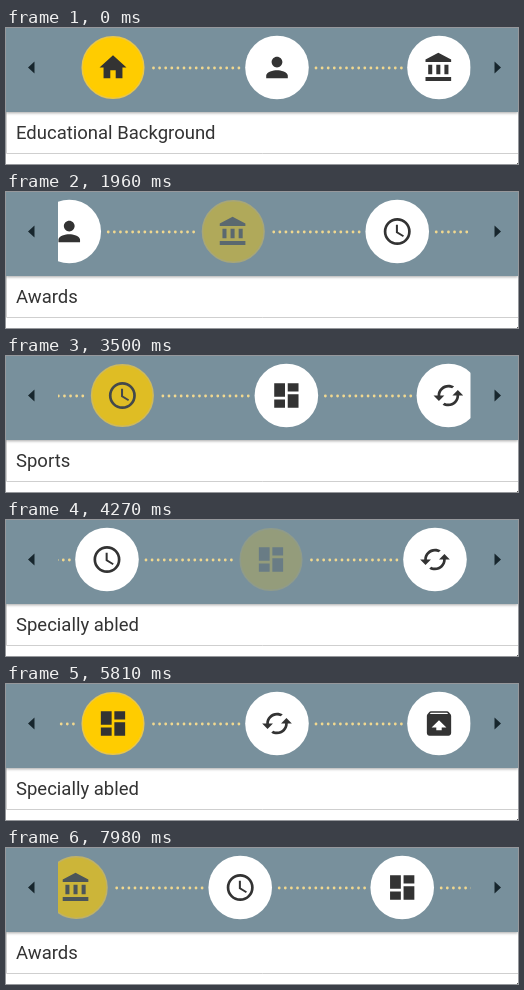
Recreate the animation shown at these times as an HTML page. Size 512x136 px, loop 8 s.

```html
<!DOCTYPE html>
<html lang="en">
<head>
<meta charset="utf-8">
<title>Profile steps</title>
<style>
  html, body { margin: 0; width: 100%; height: 100%; overflow: hidden; background: #fff; }
  svg { display: block; width: 512px; height: 136px; }
  .bar { fill: #78909c; filter: drop-shadow(0 1px 1.5px rgba(0, 0, 0, .35)); }
  .arrow { fill: #17262d; }
  .disc { fill: #fff; }
  .icon { fill: #333; }
  .active .disc { fill: #fc0; stroke: #e9c64a; stroke-width: 1.5; }
  .dots { fill: none; stroke: #f1d88f; stroke-width: 2.8; stroke-linecap: round; stroke-dasharray: 0 6.1; }
  .field { fill: none; stroke: #cfcfcf; }
  #label { font: 18.5px Roboto, sans-serif; fill: #333; }
</style>
</head>
<body>
<svg viewBox="0 0 512 136">
  <defs><clipPath id="view"><rect x="52" width="412.5" height="84"/></clipPath></defs>
  <path class="field" d="M.5 84V125.5H512"/>
  <rect class="bar" width="512" height="84"/>
  <path class="arrow" d="M22 39.5l6.5-6v12zM495 39.5l-6.5-6v12z"/>
  <g id="track" clip-path="url(#view)"></g>
  <text id="label" x="10" y="111"></text>
  <rect x="511" y="135" width="1" height="1" fill="#555"/>
</svg>
<script>
const LOOP = 8000, REST = 107, STEP = 162, MID = 39.5;

const steps = [
  ['Educational Background', 'M10 20v-6h4v6h5v-8h3L12 3 2 12h3v8z'],
  ['Professional Background', 'M12 12c2.21 0 4-1.79 4-4s-1.79-4-4-4-4 1.79-4 4 1.79 4 4 4zm0 2c-2.67 0-8 1.34-8 4v2h16v-2c0-2.66-5.33-4-8-4z'],
  ['Awards', 'M4 10v7h3v-7H4zm6 0v7h3v-7h-3zM2 22h19v-3H2v3zm14-12v7h3v-7h-3zm-4.5-9L2 6v2h19V6l-9.5-5z'],
  ['Sports', 'M12 2a10 10 0 1 0 0 20 10 10 0 0 0 0-20zm0 18a8 8 0 1 1 0-16 8 8 0 0 1 0 16zM12.5 7H11v6l5.25 3.15.75-1.23-4.5-2.67z'],
  ['Specially abled', 'M3 13h8V3H3v10zm0 8h8v-6H3v6zm10 0h8V11h-8v10zm0-18v6h8V3h-8z'],
  ['', 'M19 8l-4 4h3c0 3.31-2.69 6-6 6-1.01 0-1.97-.25-2.8-.7l-1.46 1.46C8.97 19.54 10.43 20 12 20c4.42 0 8-3.58 8-8h3l-4-4zM6 12c0-3.31 2.69-6 6-6 1.01 0 1.97.25 2.8.7l1.46-1.46C15.03 4.46 13.57 4 12 4c-4.42 0-8 3.58-8 8H1l4 4 4-4H6z'],
  ['', 'M20.55 5.22l-1.39-1.68C18.88 3.21 18.47 3 18 3H6c-.47 0-.88.21-1.15.55L3.46 5.22C3.17 5.57 3 6.01 3 6.5V19c0 1.1.89 2 2 2h14c1.1 0 2-.9 2-2V6.5c0-.49-.17-.93-.45-1.28zM12 9.5l5.5 5.5H14v2h-4v-2H6.5L12 9.5zM5.12 5l.82-1h12l.93 1H5.12z']
];

const moves = [
  { start: 387, length: 1100, to: 1, dir: 1 },
  { start: 1520, length: 1100, to: 2, dir: 1 },
  { start: 2669, length: 1100, to: 3, dir: 1 },
  { start: 4069, length: 1100, to: 4, dir: 1 },
  { start: 5987, length: 1100, to: 3, dir: -1 },
  { start: 7430, length: 895, to: 2, dir: -1 }
];
const idle = { start: -1, length: 1, to: 0, dir: 0 };

const track = document.getElementById('track');
const label = document.getElementById('label');

function add(parent, name, attrs) {
  const node = document.createElementNS('http://www.w3.org/2000/svg', name);
  for (const key in attrs) node.setAttribute(key, attrs[key]);
  return parent.appendChild(node);
}

const items = steps.map(([, icon], i) => {
  const root = add(track, 'g', {});
  const dots = i < steps.length - 1 && add(root, 'path', { class: 'dots', d: 'M39 .5h85.5' });
  const badge = add(root, 'g', {});
  const disc = add(badge, 'circle', { class: 'disc' });
  add(badge, 'path', { class: 'icon', d: icon, transform: 'scale(1.35) translate(-12 -12)' });
  return { root, dots, badge, disc };
});

const ease = p => p < .5 ? 4 * p ** 3 : 1 - 4 * (1 - p) ** 3;

function draw(time) {
  const move = moves.filter(m => m.start <= time).pop() || idle;
  const p = Math.min(1, (time - move.start) / move.length);
  const shift = move.dir * STEP * (1 - ease(p));

  items.forEach(({ root, dots, badge, disc }, i) => {
    const gap = i - move.to, active = gap === 0;
    // The active step is 4px wider than the others.
    const x = REST + shift + gap * STEP + Math.sign(gap) * 2;
    root.setAttribute('transform', `translate(${x} ${MID})`);
    badge.setAttribute('class', active ? 'active' : '');
    badge.setAttribute('opacity', active ? .03 + .97 * p : 1);
    disc.setAttribute('r', active ? 30.8 : 31.8);
    if (dots) dots.setAttribute('transform', `translate(${active ? 1.5 : 0} 0)`);
  });

  const text = steps[move.to][0];
  if (label.textContent !== text) label.textContent = text;
}

const origin = performance.now();
function tick() {
  draw((performance.now() - origin) % LOOP);
  requestAnimationFrame(tick);
}
tick();
</script>
</body>
</html>
```
